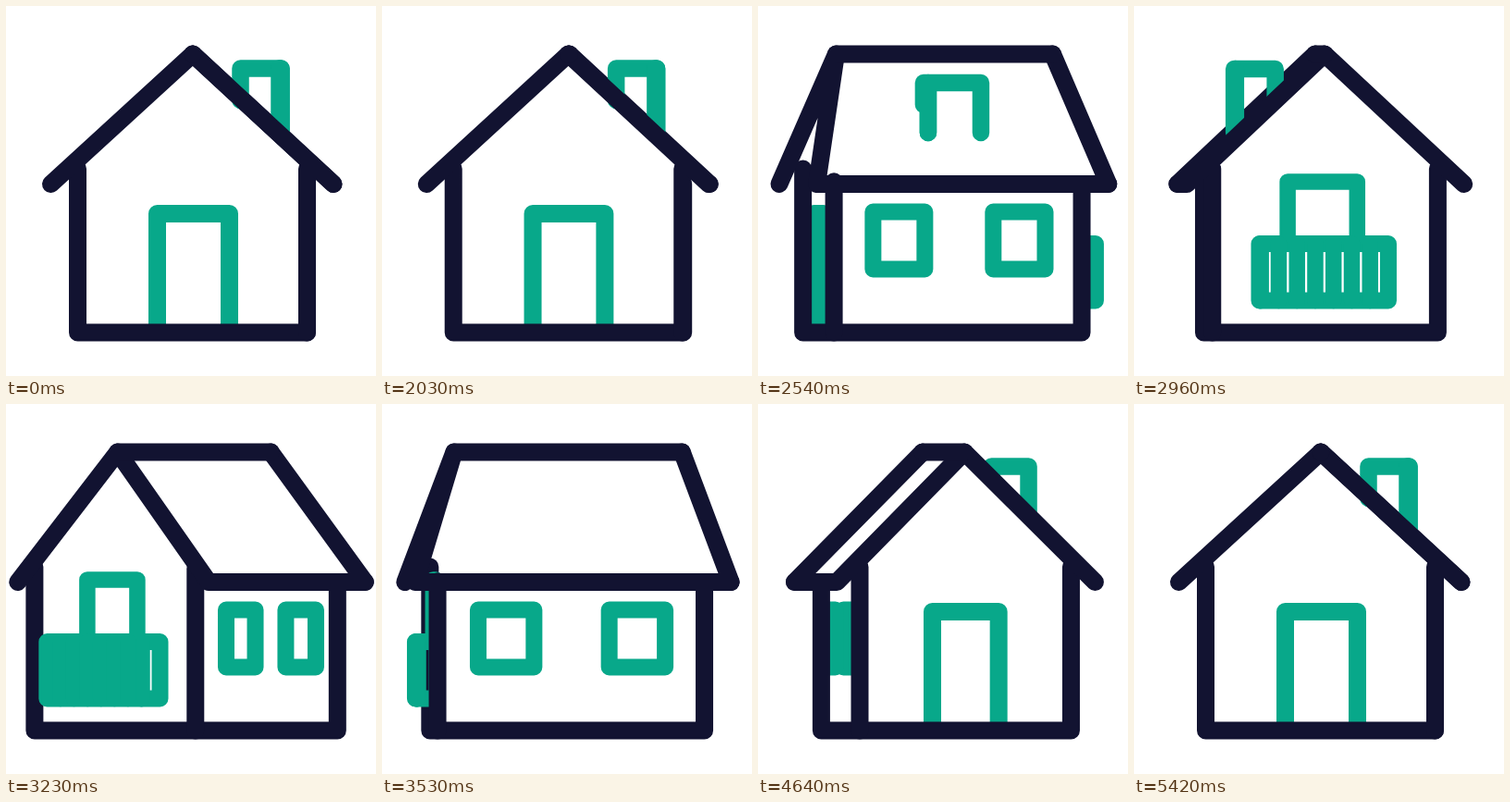
An HTML page with a canvas that plays this animation: 400 px wide and 400 px high, repeating every 5.45 s.

```html
<!DOCTYPE html>
<html lang="en">
<head>
<meta charset="utf-8">
<title>Turning house</title>
<style>
  html, body { margin: 0; width: 100%; height: 100%; overflow: hidden; background: #fff; }
  canvas { display: block; width: 100vw; height: 100vh; }
</style>
</head>
<body>
<canvas id="stage"></canvas>
<script>
const LOOP = 5450, START = 2000, TURN = 3420, STEP = 30;
const NAVY = '#121331', GREEN = '#08a88a';
const CENTER = 201.5, TOP = 52, WALL_TOP = 176, EAVE = 192.5, BASE = 353;
const WALL = 19, WINDOW = 18;

// Horizontal offsets from the centre in three poses: face on, three-quarter, side on.
// The visible face turns to the left while the side wall opens on the right.
const POSES = {
  wallFar: [-124, -171, -148.5], wallNear: [124, 6, -149.5], wallEnd: [124, 157, 146.5],
  eaveFar: [-153, -189, -176], eaveNear: [152.5, 21, -176], eaveEnd: [152.5, 187, 175],
  ridgeFace: [0.5, -80, -126], ridgeEnd: [0.5, 84, 125],
  doorA: [-38, -113, -148], doorB: [40, -58, -148],
  backDoorA: [-35, -113, -148], backDoorB: [41.5, -58, -148],
  railFar: [-68, -157, -166], railNear: [72.5, -53, -169], railWall: [72.5, -33, -148],
  railHidden: [120, 136, 170],
  win1: [124, 39, -105], win2: [124, 70, -43], win3: [124, 102, 41], win4: [124, 134, 103],
  stackFace: [52, 0, -28], stackA: [96, 26, -28], stackB: [94, 83, 29],
  stackHidA: [-52, -48, -48], stackHidB: [-96, -78, -78]
};

const canvas = document.getElementById('stage');
const ctx = canvas.getContext('2d');

const mix = (a, b, k) => a + (b - a) * k;
const pose = (v, h) => h < 1 ? mix(v[0], v[1], h) : mix(v[1], v[2], h - 1);

// Cubic bezier easing with flat ends
function ease(x) {
  if (x <= 0 || x >= 1) return x <= 0 ? 0 : 1;
  let lo = 0, hi = 1;
  for (let i = 0; i < 30; i++) {
    const s = (lo + hi) / 2, r = 1 - s;
    if (3 * .183 * r * r * s + 3 * .243 * r * s * s + s * s * s < x) lo = s;
    else hi = s;
  }
  return lo * lo * (3 - 2 * lo);
}

function trace(points) {
  ctx.beginPath();
  points.forEach(([x, y]) => ctx.lineTo(x, y));
}

function line(color, width, ...points) {
  trace(points);
  ctx.strokeStyle = color;
  ctx.lineWidth = width;
  ctx.stroke();
}

function fill(...points) {
  trace(points);
  ctx.fillStyle = '#fff';
  ctx.fill();
}

function frame(x1, x2, y1, y2) {
  line(GREEN, WINDOW, [x1, y1], [x2, y1], [x2, y2], [x1, y2], [x1, y1], [x2, y1]);
}

function arch(x1, x2, top, bottom, width, bottom2 = bottom) {
  line(GREEN, width, [x1, bottom], [x1, top], [x2, top], [x2, bottom2]);
}

function balcony(p) {
  arch(p.backDoorA, p.backDoorB, 190, 257, 17.5);
  frame(p.railNear, p.railWall, 257, 318.5);
  frame(p.railFar, p.railNear, 257, 318.5);
  for (let i = 1; i < 7; i++) {
    const x = mix(p.railFar, p.railNear, i / 7);
    line(GREEN, 17.5, [x, 257], [x, 318.5]);
  }
}

function house(u) {
  const half = u % 8 < 4 ? 0 : 1;
  const w = u % 4;
  const mirrored = w > 2;
  const h = mirrored ? 4 - w : w;
  const front = mirrored === (half === 1);
  const p = {};
  for (const name in POSES) p[name] = CENTER + pose(POSES[name], h);

  ctx.save();
  if (mirrored) {
    ctx.translate(2 * CENTER, 0);
    ctx.scale(-1, 1);
  }

  // Parts behind the house
  if (half && h < 1) arch(p.stackHidA, p.stackHidB, 67.5, 102, 18.5, 137);
  if (front && h > 1) frame(CENTER + 120, p.railHidden, 257, 318.5);

  // White surfaces
  const ridge = [p.ridgeFace, TOP];
  const ridgeEnd = [p.ridgeEnd, TOP], eaveEnd = [p.eaveEnd, EAVE];
  fill([p.wallFar, BASE], [p.wallFar, WALL_TOP], ridge, [p.wallNear, WALL_TOP], [p.wallNear, BASE]);
  fill([p.wallNear, BASE], [p.wallNear, EAVE], [p.wallEnd, EAVE], [p.wallEnd, BASE]);
  fill(ridge, ridgeEnd, eaveEnd, [p.eaveNear, EAVE]);

  // Green details on the surfaces; the chimney stands in front of the far roof edge
  line(NAVY, WALL, ridgeEnd, eaveEnd);
  if (!half) {
    const top = pose([67.5, 75, 85], h);
    arch(p.stackFace, p.stackA, top, pose([102, 106, 107], h), 18.5, 137);
    arch(p.stackA, p.stackB, top, 137, 18.5);
  }
  frame(p.win1, p.win2, 222.5, 284.5);
  frame(p.win3, p.win4, 222.5, 284.5);
  if (front) arch(p.doorA, p.doorB, 224.5, BASE - 5, 19);

  // Navy outline
  line(NAVY, WALL, [p.wallFar, WALL_TOP], [p.wallFar, BASE], [p.wallEnd, BASE], [p.wallEnd, EAVE]);
  if (!front) balcony(p);
  line(NAVY, WALL, [p.wallNear, pose([WALL_TOP, WALL_TOP + 2, EAVE], h)], [p.wallNear, BASE]);
  line(NAVY, WALL, [p.eaveFar, EAVE], ridge, [p.eaveNear, EAVE], eaveEnd);
  line(NAVY, WALL, ridge, ridgeEnd);
  ctx.restore();
}

function draw() {
  const scale = window.devicePixelRatio || 1;
  const width = Math.round(innerWidth * scale), height = Math.round(innerHeight * scale);
  if (canvas.width !== width || canvas.height !== height) {
    canvas.width = width;
    canvas.height = height;
  }
  ctx.setTransform(width / 400, 0, 0, height / 400, 0, 0);
  ctx.fillStyle = '#fff';
  ctx.fillRect(0, 0, 400, 400);
  ctx.lineCap = ctx.lineJoin = 'round';

  const time = performance.now() % LOOP - START;
  house(8 * ease(Math.floor(time / STEP) * STEP / TURN));
  requestAnimationFrame(draw);
}
draw();
</script>
</body>
</html>
```
